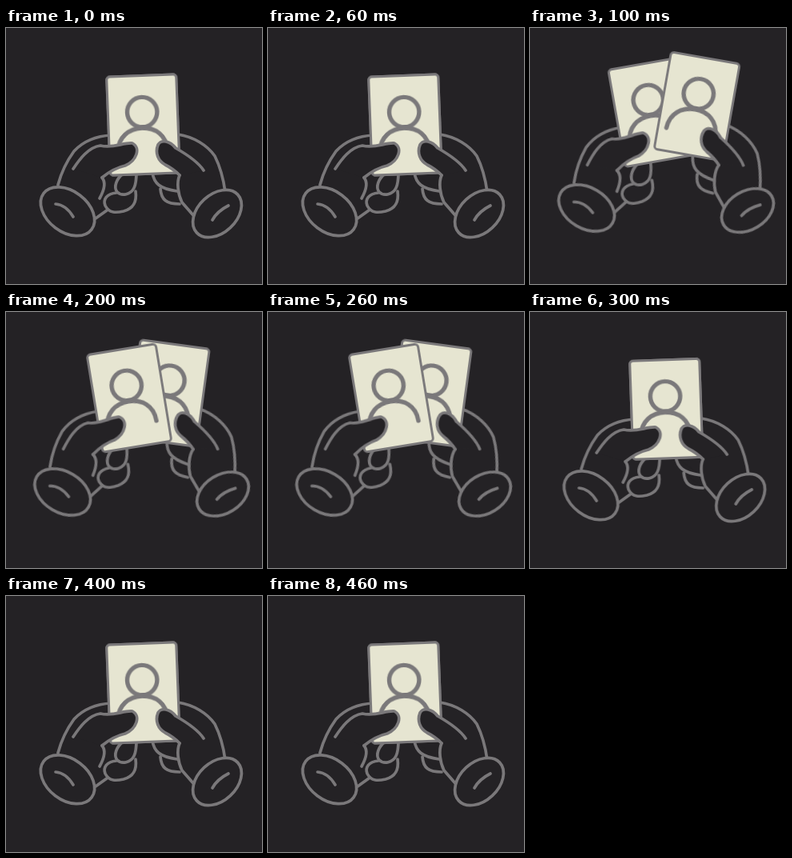
An HTML page that plays this animation: 320 by 320 pixels, repeating every 500 ms.

```html
<!DOCTYPE html>
<html lang="en">
<head>
<meta charset="utf-8">
<title>Shuffling cards</title>
<style>
  :root { --bg: #242225; --line: #7a787a; --paper: #e6e5d1; }
  html, body { margin: 0; width: 100%; height: 100%; overflow: hidden; background: var(--bg); }
  svg { display: block; width: 100%; height: 100%; }
  path, ellipse, rect, circle {
    fill: none; stroke: var(--line); stroke-width: 3.7;
    stroke-linecap: round; stroke-linejoin: round;
  }
  .skin { fill: var(--bg); }
  .paper { fill: var(--paper); stroke-width: 2.9; }
  .icon { stroke-width: 5.4; }

  /* Poses are held and switched hard every 100 ms */
  .left, .right, .front, .back { animation: 500ms step-end infinite; }
  .left { transform-origin: 77px 229px; animation-name: left; }
  .right { transform-origin: 264px 232px; animation-name: right; }
  .front { animation-name: front; }
  .back { animation-name: back; }

  @keyframes left {
    0%, 80%, 100% { transform: none; }
    20%, 40% { transform: translate(-6.3px, -4.3px) rotate(-6.5deg); }
    60% { transform: translate(-.8px, 0); }
  }
  @keyframes right {
    0%, 80%, 100% { transform: none; }
    20% { transform: translate(8px, -4px) rotate(12deg); }
    40% { transform: translate(7px, -4.5px) rotate(11deg); }
    60% { transform: translate(-.8px, 0); }
  }
  @keyframes front {
    0%, 80%, 100% { transform: translate(171.5px, 121px) rotate(-2.2deg); }
    20% { transform: translate(208.7px, 98px) rotate(10deg); }
    40% { transform: translate(154px, 107.5px) rotate(-9.3deg); }
    60% { transform: translate(170.3px, 121.3px) rotate(-2deg); }
  }
  @keyframes back {
    0%, 80%, 100% { transform: translate(171.5px, 121px) rotate(-2.2deg); }
    20% { transform: translate(151.3px, 105.5px) rotate(-10deg); }
    40% { transform: translate(203px, 101.5px) rotate(7.7deg); }
    60% { transform: translate(170.3px, 121.3px) rotate(-2deg); }
  }
</style>
</head>
<body>
<svg viewBox="0 0 320 320">
  <defs>
    <g id="card">
      <rect class="paper" x="-43.5" y="-61.5" width="87" height="123" rx="4"/>
      <circle class="icon" cx="-.7" cy="-15.9" r="18.7"/>
      <path class="icon" d="M-33 33C-32 14 -18 4 -1.5 4S29 14 29 33.5"/>
    </g>
  </defs>

  <!-- Palms and fingers behind the cards -->
  <g class="left">
    <path d="M65 196C69 181 77 165 85 154C97 141 112 135 132 134"/>
    <path class="skin" d="M138 206C126 207 121 214 124 222C129 232 138 231 147 229C158 226 164 219 162 204"/>
    <path class="skin" d="M146 182C138 189 134 199 139 205C145 211 156 208 160 200C163 194 163 188 163 180"/>
    <path d="M112 238L126 228"/>
  </g>
  <g class="right">
    <path d="M274 205C272 190 267 172 261 160C252 147 235 136 215 133"/>
    <path class="skin" d="M193 201C194 215 201 220 217 220"/>
    <path class="skin" d="M183 181C185 194 192 201 214 204"/>
  </g>

  <g class="back"><use href="#card"/></g>
  <g class="front"><use href="#card"/></g>

  <!-- Thumbs and cuffs -->
  <g class="left">
    <path class="skin" d="M84 176C92 164 103 149 118 147C134 151 146 143 158 144C169 150 163 166 149 172C140 174 131 178 120 187"/>
    <path d="M120 187C126 194 122 204 117 213"/>
    <ellipse class="skin" cx="77" cy="229.3" rx="37.5" ry="25.5" transform="rotate(37 77 229.3)"/>
    <path d="M62 220Q75 221 84 236"/>
  </g>
  <g class="right">
    <path class="skin" d="M247 178C240 167 226 158 212 150C205 141 194 139 190 146C186 156 190 166 199 171C207 175 212 179 217 184"/>
    <path d="M217 184C213 193 215 208 220 218L234 234"/>
    <ellipse class="skin" cx="264" cy="232" rx="35" ry="24" transform="rotate(-43 264 232)"/>
    <path d="M258 240Q264 229 278 222"/>
  </g>
</svg>
</body>
</html>
```
